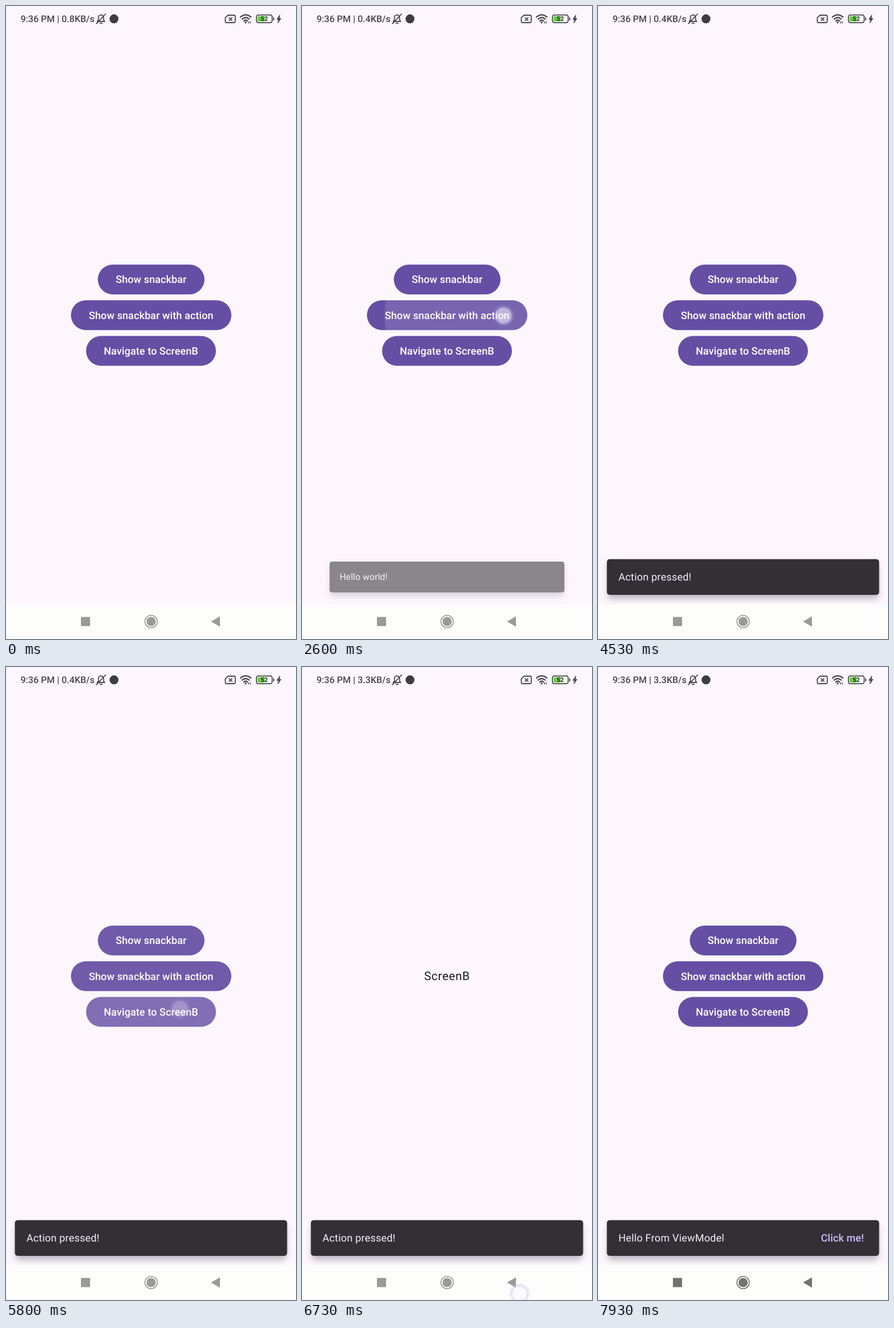
An HTML page for the animation above (8 s loop, 507 by 1104 pixels).

```html
<!DOCTYPE html>
<html lang="en">
<head>
<meta charset="utf-8">
<title>Snackbar demo</title>
<style>
  html, body { margin: 0; width: 100%; height: 100%; overflow: hidden; background: #fdf7fd; }
  svg { display: block; width: 507px; height: 1104px; font-family: Roboto, sans-serif; }
  text { text-rendering: geometricPrecision; }
  .label { font-size: 18px; font-weight: 500; letter-spacing: .07px; fill: #fff; text-anchor: middle; }
  .body { font-size: 18px; letter-spacing: .2px; fill: #f5eff7; }
  .action { font-size: 18px; font-weight: 500; letter-spacing: .07px; fill: #d0bcff; }
  .title { font-size: 20.6px; letter-spacing: .65px; fill: #1d1b20; text-anchor: middle; }
  .status { font-size: 16px; font-weight: 500; fill: #464548; }
</style>
</head>
<body>
<svg viewBox="0 0 507 1104" xmlns="http://www.w3.org/2000/svg">
  <defs>
    <filter id="soft" x="-10%" y="-60%" width="120%" height="220%"><feGaussianBlur stdDeviation="6"/></filter>
    <radialGradient id="dot">
      <stop offset="0" stop-color="#fff" stop-opacity=".6"/>
      <stop offset=".64" stop-color="#f4f3fa" stop-opacity=".58"/>
      <stop offset=".7" stop-color="#bfbce8" stop-opacity=".6"/>
      <stop offset=".78" stop-color="#c4c0ee" stop-opacity=".24"/>
      <stop offset="1" stop-color="#cfcbf5" stop-opacity="0"/>
    </radialGradient>
    <clipPath id="actionClip"><rect x="374" y="970" width="107" height="52" rx="26"/></clipPath>
  </defs>

  <rect width="507" height="1104" fill="#fdf7fd"/>
  <g id="screenA"></g>
  <g id="screenB"><text class="title" x="253.6" y="546">ScreenB</text></g>

  <rect y="1043" width="507" height="61" fill="#fdfdfb"/>

  <g id="snack">
    <rect x="17" y="972" width="473" height="62" rx="6" fill="#3b374c" opacity=".34" filter="url(#soft)"/>
    <rect x="15.5" y="964.8" width="476" height="62.2" rx="5" fill="#322f35"/>
    <g clip-path="url(#actionClip)"><circle id="actionRipple" fill="#d0bcff"/></g>
    <text id="message" class="body" x="35.8" y="1002"></text>
    <text id="action" class="action" x="389.8" y="1002">Click me!</text>
  </g>

  <g id="nav">
    <rect x="131" y="1065.5" width="16" height="16"/>
    <circle cx="253.7" cy="1073.5" r="8"/>
    <circle cx="253.7" cy="1073.5" r="10.8" fill="none" stroke-width="1.6"/>
    <path d="M358.5 1073.5 374 1064.5V1082.5Z"/>
  </g>

  <text id="status" class="status" x="25.5" y="28.2"></text>
  <g fill="none" stroke="#464548" stroke-width="1.8" stroke-linecap="round" stroke-linejoin="round">
    <path d="M159.5 27H172.5L170.6 24.2V20C170.6 14.2 161.6 14.2 161.6 20V24.4ZM164.5 30.2H168M174 14 158 30.8"/>
    <path d="M388.2 16H398.5Q400.8 16 400.8 18.2V26.8Q400.8 29 398.5 29H385.6Q383.4 29 383.4 26.8V20.6Z"/>
    <path d="M390.2 20.4 395 25.2M395 20.4 390.2 25.2"/>
    <path d="M410 19.2Q419 11.6 428 19.2M413 22.7Q419 17.8 425 22.7M416 26Q419 23.6 422 26" stroke-width="2.3"/>
    <rect x="437.8" y="15.6" width="27.6" height="13.6" rx="3.6"/>
    <path d="M468 20.6V24.2"/>
  </g>
  <circle cx="419" cy="28.8" r="1.7" fill="#464548"/>
  <path d="M424.3 26.5V30.5M427.3 26.5V30.5" stroke="#464548" stroke-width="1.3"/>
  <circle cx="188.8" cy="22.4" r="7.8" fill="#3d3c3f"/>
  <path d="M440 19.6Q440 17.7 442 17.7H452V27.1H442Q440 27.1 440 25.2Z" fill="#64cf3c"/>
  <text x="451.6" y="26.4" font-size="11" font-weight="700" fill="#333" text-anchor="middle">52</text>
  <path d="M478.8 15.4 473.4 23.4H476.4L475.4 29.8 480.8 21.6H477.8Z" fill="#464548" stroke="#464548" stroke-width=".8"/>

  <circle id="touch" r="20" fill="url(#dot)"/>
</svg>
<script>
const LOOP = 8000, FADE_IN = 150, FADE_OUT = 75, NAV_MS = 700;
const $ = id => document.getElementById(id);
const set = (el, attrs) => { for (const k in attrs) el.setAttribute(k, attrs[k]); };
const mix = (a, b, p) => a + (b - a) * p;
const ramp = (t, from, ms) => Math.min(1, Math.max(0, (t - from) / ms));

// cubic-bezier(.4, 0, .2, 1)
function ease(x) {
  let lo = 0, hi = 1, u = .5;
  for (let i = 0; i < 24; i++) {
    u = (lo + hi) / 2;
    const bx = 1.2 * u * (1 - u) ** 2 + .6 * u * u * (1 - u) + u ** 3;
    if (bx < x) lo = u; else hi = u;
  }
  return x <= 0 ? 0 : x >= 1 ? 1 : 3 * u * u * (1 - u) + u ** 3;
}

const buttons = [
  { x: 160.5, y: 450.9, w: 186.5, label: 'Show snackbar' },
  { x: 113.5, y: 513.2, w: 280.5, label: 'Show snackbar with action' },
  { x: 140, y: 575.5, w: 227, label: 'Navigate to ScreenB' }
].map(b => ({ ...b, h: 52 }));

$('screenA').innerHTML = buttons.map((b, i) => {
  const pill = `<rect x="${b.x}" y="${b.y}" width="${b.w}" height="${b.h}" rx="26"`;
  return `<clipPath id="clip${i}">${pill}/></clipPath>${pill} fill="#654fa4"/>
    <g clip-path="url(#clip${i})"><circle id="ripple${i}" fill="#fff"/></g>
    <text class="label" x="${b.x + b.w / 2}" y="${b.y + 32.5}">${b.label}</text>`;
}).join('');
buttons.forEach((b, i) => b.ripple = $('ripple' + i));
const actionButton = { x: 374, y: 970, w: 107, h: 52, ripple: $('actionRipple') };

const taps = [
  { at: 1000, x: 313, y: 471, button: buttons[0] },
  { at: 2495, x: 352.5, y: 540, button: buttons[1] },
  { at: 3865, x: 424.5, y: 990, button: actionButton },
  { at: 5630, x: 304, y: 596, button: buttons[2] },
  { at: 6725, x: 380.5, y: 1093 }
];

const snacks = [
  { show: 1100, hide: 2567, text: 'Hello world!' },
  { show: 2642, hide: 3975, text: 'Hello From ViewModel', action: true },
  { show: 4050, hide: 7562, text: 'Action pressed!' },
  { show: 7637, hide: 9000, text: 'Hello From ViewModel', action: true }
];

function drawRipple(tap, t) {
  const b = tap.button, age = t - tap.at;
  const p = ease(ramp(age, 0, 225));
  const end = Math.hypot(b.w, b.h) / 2 + 13;
  set(b.ripple, {
    cx: mix(tap.x, b.x + b.w / 2, p),
    cy: mix(tap.y, b.y + b.h / 2, p),
    r: mix(b.w * .3, end, p),
    opacity: .12 * ramp(age, -10, 75) * (1 - ramp(age, 240, 150))
  });
}

function drawSnack(t) {
  const s = snacks.find(s => t >= s.show && t < s.hide + FADE_OUT);
  $('snack').style.display = s ? '' : 'none';
  if (!s) return;
  const shown = ramp(t, s.show, FADE_IN), gone = ramp(t, s.hide, FADE_OUT);
  const k = .8 + .2 * (ease(shown) - ease(gone));
  set($('snack'), {
    opacity: shown * (1 - gone),
    transform: `translate(253.5 996) scale(${k}) translate(-253.5 -996)`
  });
  $('message').textContent = s.text;
  $('action').style.display = s.action ? '' : 'none';
}

function draw(t) {
  const away = ease(ramp(t, 5690, NAV_MS)) - ease(ramp(t, 6790, NAV_MS));
  set($('screenA'), { opacity: 1 - away });
  set($('screenB'), { opacity: away });

  taps.forEach(tap => tap.button && drawRipple(tap, t));
  const tap = taps.find(p => t >= p.at && t < p.at + 250);
  set($('touch'), tap
    ? { cx: tap.x, cy: tap.y, opacity: 1 - ramp(t, tap.at + 100, 130) }
    : { opacity: 0 });

  drawSnack(t);

  const grey = Math.round(mix(154, 114, ramp(t, 6780, 150)));
  const tone = `rgb(${grey},${grey},${grey})`;
  set($('nav'), { fill: tone, stroke: tone, 'stroke-width': 0 });

  const rate = t < 2000 ? '0.8' : t < 6000 ? '0.4' : '3.3';
  $('status').textContent = `9:36 PM | ${rate}KB/s`;
}

let start;
function tick(now) {
  if (start === undefined) start = now;
  draw((now - start) % LOOP);
  requestAnimationFrame(tick);
}
draw(0);
requestAnimationFrame(tick);
</script>
</body>
</html>
```
